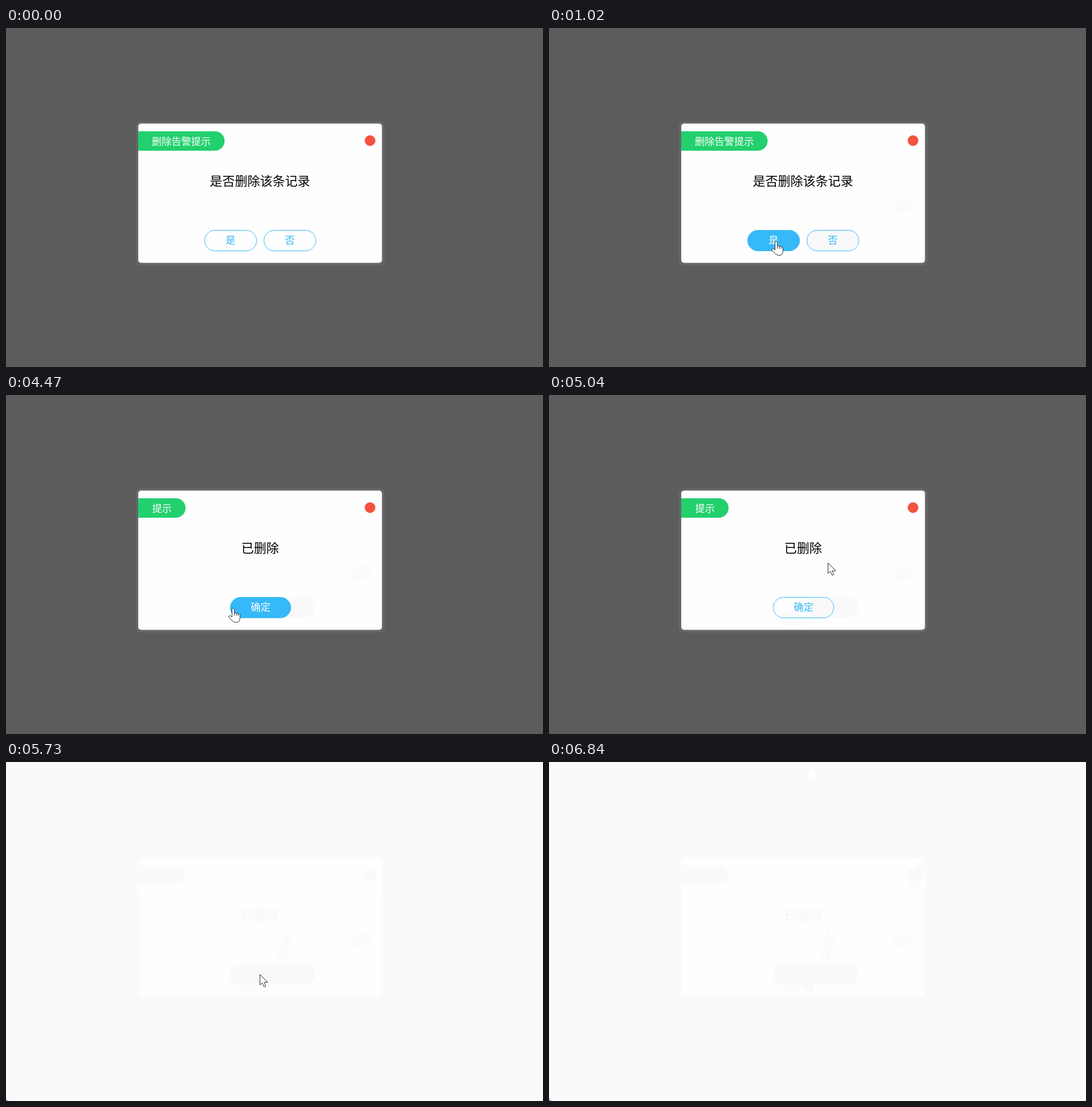
These frames come from a looping animation (942 px wide and 594 px high, 8000 ms). An HTML page:

```html
<!DOCTYPE html>
<html lang="zh">
<head>
<meta charset="utf-8">
<title>删除提示</title>
<style>
  html, body { margin: 0; width: 100%; height: 100%; overflow: hidden; background: #5c5c5c; }
  svg { display: block; width: 942px; height: 594px; }
  text { font-family: "Noto Sans CJK SC", "Noto Sans CJK", sans-serif; text-anchor: middle; font-size: 17.3px; }
  .msg { font-size: 22px; }
  .btn rect { fill: none; stroke: #36b7f7; }
  .btn text { fill: #36b7f7; }
  .btn.on rect { fill: #36b9f8; }
  .btn.on text { fill: #fff; }
  .cur { fill: #fff; stroke: #2b2b33; stroke-linejoin: round; }
  #trail { fill: none; stroke: #f9f9f9; }
</style>
</head>
<body>
<svg viewBox="0 0 942 594">
  <defs>
    <path id="arrow" d="M.5 .5V18.7L4.5 14.8L7.8 22L10.8 20.7L7.8 14H14.2Z"/>
    <path id="hand" d="M-.5 16V2.5Q-.5.5 1.5.5T3.5 2.5V9Q6.2 7.6 7 9.9Q9.6 8.6 10.3 11Q13.4 9.8 13.4 13V17.5Q13.2 25.5 7 25.5Q2 25.5 -1 21.5L-6.2 16.4Q-6.9 13.8 -4.4 13.6Q-2.4 14 -.5 16ZM3.5 9V13.5M7 10V13.8M10.3 11V14"/>
    <clipPath id="inside"><rect x="233" y="168" width="426" height="243" rx="5"/></clipPath>
    <filter id="soft"><feGaussianBlur stdDeviation="1.3"/></filter>
  </defs>

  <g id="dim">
    <rect width="942" height="594" fill="#5c5c5c"/>
    <rect x="228" y="164" width="436" height="252" rx="8" fill="#676769" filter="url(#soft)"/>
    <rect x="232" y="167.5" width="427.5" height="244" rx="5" fill="#fefefe"/>
  </g>
  <g id="page">
    <rect width="942" height="594" fill="#fafafa"/>
    <path d="M0 588Q0 594 6 594H0Z" fill="#8c8c8c"/>
    <path d="M237 168H655Q660 168 660 173V226H658V410H234V226H232V173Q232 168 237 168Z" fill="#fefefe"/>
    <path d="M232 181H298A16.5 16.5 0 0 1 298 214H232Z" fill="#fafafa"/>
    <rect x="629" y="187.5" width="19" height="19.5" rx="6" fill="#f9f9f9"/>
    <text class="msg" x="446" y="276" fill="#f8f8f8" stroke="#f8f8f8">已删除</text>
    <rect x="393" y="354.5" width="149.5" height="35" rx="17.5" fill="#f9f9f9"/>
  </g>
  <g id="trail" clip-path="url(#inside)"></g>
  <rect id="residue" x="452" y="354.5" width="90.5" height="35" rx="17.5" fill="#f9f9f9"/>

  <g id="frame">
    <path id="tab" fill="#22d06d"/>
    <circle cx="638.6" cy="197.3" r="9.1" fill="#f6513f" stroke="#e8796b" stroke-width=".8"/>
  </g>
  <g id="ask">
    <text x="307.5" y="205" fill="#fff">删除告警提示</text>
    <text class="msg" x="445.5" y="276">是否删除该条记录</text>
    <g class="btn" id="yes"><rect x="348.5" y="354.5" width="91" height="36" rx="18"/><text x="394" y="378">是</text></g>
    <g class="btn" id="no"><rect x="452.5" y="354.5" width="91" height="36" rx="18"/><text x="497.8" y="378">否</text></g>
  </g>
  <g id="done">
    <text x="273.5" y="205" fill="#fff">提示</text>
    <text class="msg" x="445.8" y="276">已删除</text>
    <g class="btn" id="ok"><rect x="393.5" y="354.5" width="106" height="36" rx="18"/><text x="446.5" y="378">确定</text></g>
  </g>
  <use id="exit" href="#arrow" x="456" y="9" fill="#fff" stroke="#fff"/>
  <use id="cursor" class="cur"/>
</svg>
<script>
const LOOP = 8000, STEP = 30;
const ENTER = 270, DONE = 4470, WAKE = 4680, ARROW = 5700, CLOSE = 5730, LEAVE = 6840;
const $ = id => document.getElementById(id);
const linear = k => k;
const easeOut = k => 1 - (1 - k) ** 2;

// each leg of the pointer's way: end time, end point, easing
const legs = [
  { t: ENTER, x: 922, y: 172 },
  { t: 360, x: 627, y: 296 },
  { t: 570, x: 605, y: 306 },
  { t: 720, x: 513, y: 352 },
  { t: 1020, x: 397, y: 373, ease: easeOut },
  { t: WAKE, x: 397, y: 373 },
  { t: 4830, x: 435, y: 379 },
  { t: 4920, x: 470, y: 348 },
  { t: 5070, x: 490, y: 292, ease: easeOut },
  { t: 5250, x: 470, y: 350 },
  { t: 5370, x: 445, y: 372, ease: easeOut },
  { t: 5790, x: 445, y: 372 },
  { t: 6150, x: 453, y: 382 },
  { t: 6210, x: 506, y: 279 },
  { t: 6270, x: 631, y: 204 },
  { t: 6630, x: 651, y: 172 },
  { t: 6810, x: 456, y: 9 }
];

function pos(t) {
  const i = Math.max(1, legs.findIndex(leg => leg.t >= t));
  const from = legs[i - 1], to = legs[i];
  if (t > legs.at(-1).t) return [legs.at(-1).x, legs.at(-1).y];
  const k = (to.ease || linear)(Math.max(0, (t - from.t) / (to.t - from.t)));
  return [from.x + (to.x - from.x) * k, from.y + (to.y - from.y) * k].map(Math.round);
}

function hovered(t) {
  if (t < ENTER || t >= CLOSE) return null;
  const [x, y] = pos(t);
  const ids = t < DONE ? ["yes", "no"] : ["ok"];
  return ids.find(id => {
    const { x: bx, y: by, width, height } = $(id).firstElementChild;
    const dx = x - bx.baseVal.value, dy = y - by.baseVal.value;
    return dx >= 0 && dx <= width.baseVal.value && dy >= 0 && dy <= height.baseVal.value;
  }) || null;
}

function place(use, t) {
  const [x, y] = pos(t);
  use.setAttribute("href", hovered(t) && t < ARROW ? "#hand" : "#arrow");
  use.setAttribute("x", x);
  use.setAttribute("y", y);
}

// faint marks that stay where the pointer has been
const marks = [];
let last = "";
for (let t = ENTER; t < LEAVE; t += STEP) {
  const here = pos(t).join();
  if (here === last || (t > 720 && t < WAKE)) continue;
  last = here;
  const use = document.createElementNS("http://www.w3.org/2000/svg", "use");
  place(use, t);
  $("trail").append(use);
  marks.push([t, use]);
}

const show = (el, on) => { el.style.display = on ? "" : "none"; };

function draw(now) {
  const t = Math.floor((now % LOOP) / STEP) * STEP;
  const open = t < CLOSE, ask = t < DONE, hot = hovered(t);
  show($("dim"), open);
  show($("frame"), open);
  show($("page"), !open);
  show($("ask"), ask);
  show($("done"), open && !ask);
  show($("residue"), open && t > 810);
  show($("exit"), t >= LEAVE);
  show($("cursor"), t >= ENTER && t < LEAVE);
  $("tab").setAttribute("d", `M232 181H${ask ? 366.5 : 298}a17 17 0 0 1 0 34H232Z`);
  for (const id of ["yes", "no", "ok"]) $(id).classList.toggle("on", id === hot);
  for (const [at, use] of marks) show(use, at < t);
  place($("cursor"), t);
}

const start = performance.now();
function tick() {
  draw(performance.now() - start);
  requestAnimationFrame(tick);
}
tick();
</script>
</body>
</html>
```
